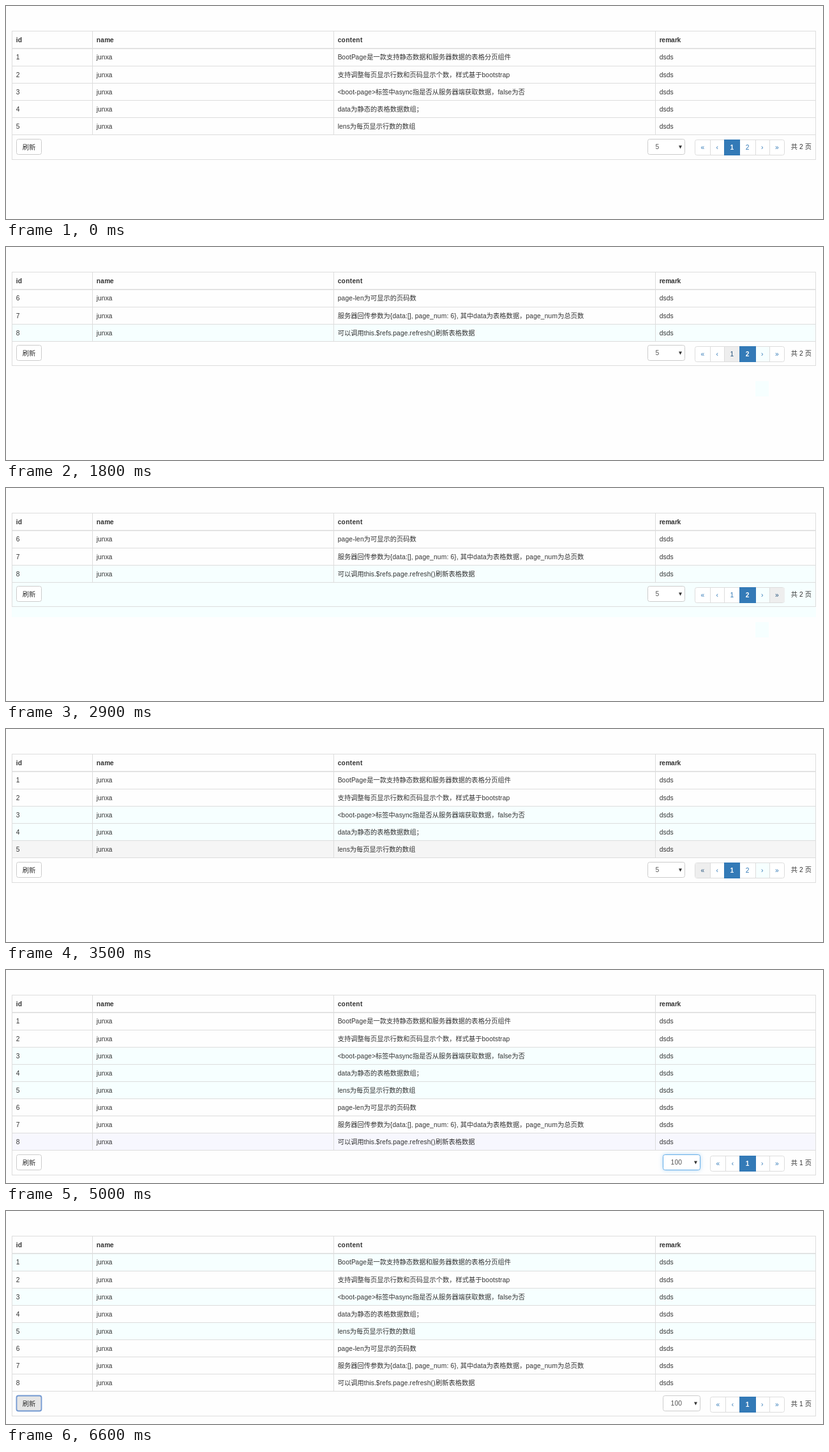
An HTML page with a canvas for the animation above (7 s loop, 1280x335 px).

```html
<!DOCTYPE html>
<html lang="zh-CN">
<head>
<meta charset="utf-8">
<title>Paged table</title>
<style>
html, body { margin: 0; width: 100%; height: 100%; overflow: hidden; background: #fefefe; }
canvas { display: block; }
</style>
</head>
<body>
<canvas id="stage" width="1280" height="335"></canvas>
<script>
const ctx = document.getElementById('stage').getContext('2d');
const LOOP = 7000;
const SCALE = 0.7331; // the page is laid out at 14px and shown reduced
const FAMILY = '"Liberation Sans", Arial, "Noto Sans CJK SC", "Noto Sans CJK", sans-serif';
const LEFT = 9, RIGHT = 1268, TOP = 39, BODY = 67, ROW = 37 * SCALE;
const COLUMNS = [9, 135, 513, 1017];
const LINE = '#ddd', INK = '#333', LINK = '#337ab7', TINT = '#f6ffff';

const CONTENT = [
  'BootPage是一款支持静态数据和服务器数据的表格分页组件',
  '支持调整每页显示行数和页码显示个数，样式基于bootstrap',
  '<boot-page>标签中async指是否从服务器端获取数据，false为否',
  'data为静态的表格数据数组；',
  'lens为每页显示行数的数组',
  'page-len为可显示的页码数',
  '服务器回传参数为{data:[], page_num: 6}, 其中data为表格数据，page_num为总页数',
  '可以调用this.$refs.page.refresh()刷新表格数据'
];

// Each step changes only what differs from the step before.
const STEPS = [
  [0, { page: 1, size: 5, row: 0, tints: [], hot: '', ghost: false, select: '', option: -1, button: '' }],
  [300, { row: 2 }],
  [400, { row: 3 }],
  [600, { row: 5, tints: [3] }],
  [700, { row: 0, hot: '›' }],
  [1300, { page: 2, hot: '1', ghost: true }],
  [2300, { page: 1, hot: '', row: 4 }],
  [2400, { row: 5, tints: [3, 4] }],
  [2500, { row: 0, tints: [3, 4, 5], hot: '›' }],
  [2700, { hot: '»' }],
  [2900, { page: 2 }],
  [3300, { hot: '«' }],
  [3400, { page: 1, row: 4 }],
  [3500, { row: 5 }],
  [3700, { row: 0 }],
  [4000, { hot: '', select: 'focus' }],
  [4100, { option: 0 }],
  [4200, { option: 2 }],
  [4500, { option: -1, size: 100, ghost: false }],
  [4600, { row: 8 }],
  [5800, { row: 7 }],
  [5900, { row: 4, tints: [3, 5] }],
  [6000, { row: 1 }],
  [6100, { row: 2, tints: [1, 3, 5] }],
  [6200, { row: 5 }],
  [6300, { row: 8 }],
  [6400, { row: 0, button: 'hover' }],
  [6500, { button: 'focus', select: '' }]
];

const stateAt = time => Object.assign({}, ...STEPS.filter(s => s[0] <= time).map(s => s[1]));

function fill(x, y, w, h, color) {
  ctx.fillStyle = color;
  ctx.fillRect(x, y, w, h);
}

function box(x, y, w, h, radius, background, border, weight = 1) {
  ctx.beginPath();
  ctx.roundRect(x + 0.5, y + 0.5, w - 1, h - 1, radius);
  ctx.fillStyle = background;
  ctx.fill();
  ctx.shadowColor = 'transparent';
  ctx.strokeStyle = border;
  ctx.lineWidth = weight;
  ctx.stroke();
}

// Whole-pixel glyph advances at 14px, as the page text is hinted.
const advance = char => Math.round(ctx.measureText(char).width);

function text(string, x, y, { color = INK, bold = false, center = false, size = 14 } = {}) {
  ctx.save();
  ctx.translate(x, y);
  ctx.scale(SCALE, SCALE);
  ctx.font = `${bold ? 'bold ' : ''}${size}px ${FAMILY}`;
  ctx.fillStyle = color;
  const chars = [...string];
  let pen = center ? -chars.reduce((sum, c) => sum + advance(c), 0) / 2 : 0;
  for (const char of chars) {
    ctx.fillText(char, pen, 0);
    pen += advance(char);
  }
  ctx.restore();
}

function drawTable(state, ids, foot) {
  const band = (row, color) =>
    fill(LEFT, Math.floor(BODY + (row - 1) * ROW), RIGHT - LEFT + 1, Math.ceil(ROW), color);
  state.tints.forEach(row => band(row, TINT));
  if (state.row) band(state.row, state.row === 8 ? '#f7f7fe' : '#f5f5f5');
  if (state.ghost) fill(1174, 211, 21, 24, TINT);

  const bottom = Math.floor(foot + 38.6);
  const width = RIGHT - LEFT + 1;
  fill(LEFT, TOP, width, 1, LINE);
  fill(LEFT, 66, width, 1.6, LINE);
  for (let i = 1; i <= ids.length; i++) fill(LEFT, Math.floor(BODY + i * ROW), width, 1, LINE);
  fill(LEFT, bottom, width, 1, LINE);
  COLUMNS.slice(1).forEach(x => fill(x, TOP, 1, foot - TOP, LINE));
  [LEFT, RIGHT].forEach(x => fill(x, TOP, 1, bottom - TOP + 1, LINE));

  ['id', 'name', 'content', 'remark'].forEach((label, i) =>
    text(label, COLUMNS[i] + 6.7, 56.6, { bold: true }));
  ids.forEach((id, i) => {
    const cells = [String(id), 'junxa', CONTENT[id - 1], 'dsds'];
    cells.forEach((cell, c) => text(cell, COLUMNS[c] + 6.7, 84.4 + i * ROW));
  });
}

function drawButton(mode, y) {
  const border = { '': '#ccc', hover: '#adadad', focus: '#7399d2' }[mode];
  box(16, y, 40, 25, 3, mode ? '#e6e6e6' : '#fff', border, mode === 'focus' ? 1.8 : 1);
  text('刷新', 36, y + 16.7, { center: true });
}

function drawPager(state, pages, y) {
  const labels = ['«', '‹', ...pages.map(String), '›', '»'];
  const widths = labels.map(label => ('‹›'.includes(label) ? 30 : 33) * SCALE);
  const left = 1219.8 - widths.reduce((a, b) => a + b);
  const start = Math.round(left), height = 25;

  ctx.save();
  box(start, y, 1220 - start, height, 3, '#fff', LINE);
  ctx.beginPath();
  ctx.roundRect(start, y, 1220 - start, height, 3);
  ctx.clip();
  let x = left;
  labels.forEach((label, i) => {
    const active = label === String(state.page);
    const hot = label === state.hot;
    const from = Math.round(x), to = Math.round(x + widths[i]);
    if (active) fill(from, y, to - from + 1, height, LINK);
    else {
      if (hot) fill(from + 1, y + 1, to - from - 1, height - 2, '#eee');
      else if (state.ghost && label === '›') fill(from + 1, y + 1, to - from - 1, height - 2, TINT);
      if (i < labels.length - 1) fill(to, y, 1, height, LINE);
    }
    text(label, x + widths[i] / 2 + 0.2, y + 16.4,
      { center: true, bold: active, color: active ? '#fff' : hot ? '#23527c' : LINK });
    x += widths[i];
  });
  ctx.restore();
  text(`共 ${pages.length} 页`, 1229.8, y + 15.4);
  return left;
}

function drawSelect(state, x, y) {
  const focused = state.select === 'focus';
  ctx.save();
  if (focused) {
    ctx.shadowColor = 'rgba(102,175,233,.6)';
    ctx.shadowBlur = 6;
  }
  box(x, y, 59, 25, 3, '#fff', focused ? '#66afe9' : '#ccc');
  ctx.restore();
  text(String(state.size), x + 12.6, y + 16.2, { color: '#555' });
  ctx.beginPath();
  ctx.moveTo(x + 49, y + 10.5);
  ctx.lineTo(x + 54, y + 10.5);
  ctx.lineTo(x + 51.5, y + 15.5);
  ctx.fillStyle = INK;
  ctx.fill();
}

function drawOptions(selected, x, y) {
  box(x, y, 59, 40, 0, '#fff', '#7f9db9');
  ['5', '10', '100'].forEach((label, i) => {
    const top = y + 1 + i * 12.7;
    const chosen = i === selected;
    if (chosen) fill(x + 1, top, 57, 12.7, '#1e90ff');
    text(label, x + 12.6, top + 10, { color: chosen ? '#fff' : '#555' });
  });
}

function draw(time) {
  const state = stateAt(time);
  const first = (state.page - 1) * state.size;
  const ids = CONTENT.map((_, i) => i + 1).slice(first, first + state.size);
  const pages = state.size < CONTENT.length ? [1, 2] : [1];
  const foot = BODY + ids.length * ROW;
  const y = Math.floor(foot + 6.6);

  fill(0, 0, 1280, 335, '#fefefe');
  drawTable(state, ids, foot);
  drawButton(state.button, y);
  const pagerLeft = drawPager(state, pages, Math.round(foot + 7.6));
  const selectX = Math.round(pagerLeft - 73.9);
  drawSelect(state, selectX, y);
  if (state.option >= 0) drawOptions(state.option, selectX, y + 25);
}

const began = performance.now();
function tick() {
  draw((performance.now() - began) % LOOP);
  requestAnimationFrame(tick);
}
tick();
</script>
</body>
</html>
```
